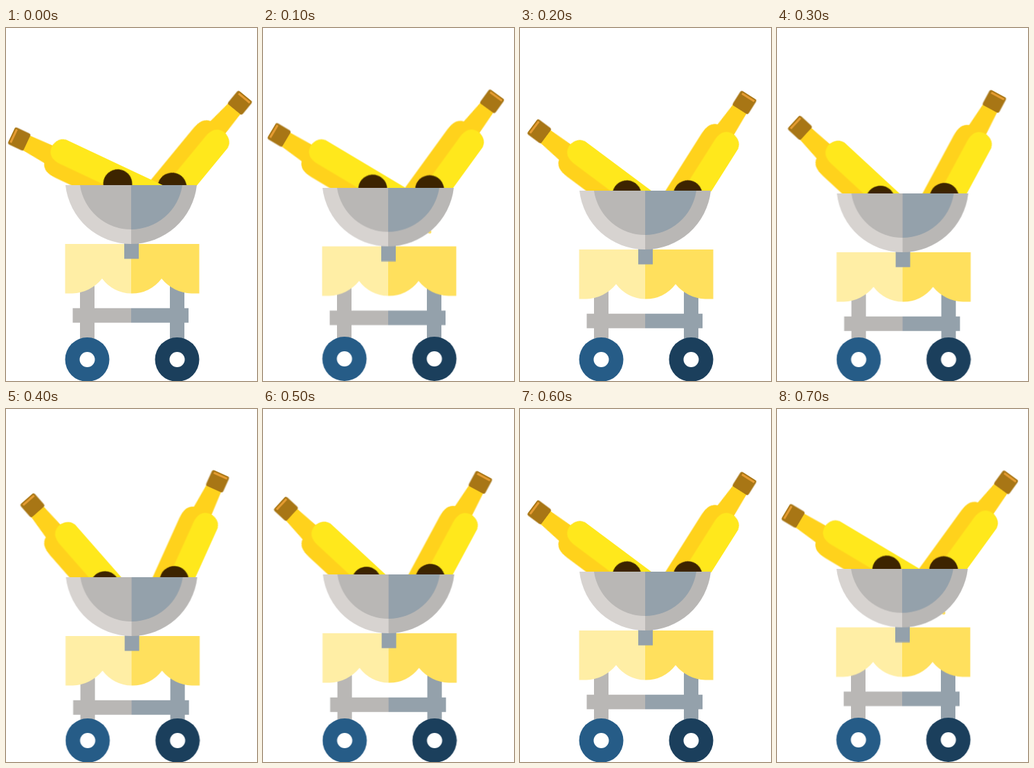
Recreate the animation shown at these times as an HTML page. Size 363 px wide and 510 px high, loop 0.8 s.

```html
<!DOCTYPE html>
<html lang="en">
<head>
<meta charset="utf-8">
<title>Bottle cart</title>
<style>
html, body { margin: 0; width: 100%; height: 100%; overflow: hidden; background: #fff; }
svg { display: block; width: 363px; height: 510px; }
.cart, .wheels, .left, .right, .tip { animation: 800ms step-end infinite; }
.cart { animation-name: cart; }
.wheels { animation-name: wheels; }
.left { animation-name: left; }
.right { animation-name: right; }
.tip { animation-name: tip; }

/* Five poses, played down and back up */
@keyframes cart {
  0%, 100% { transform: translate(0, 0); }
  12.5%, 87.5% { transform: translate(0, 3.5px); }
  25%, 75% { transform: translate(0, 8px); }
  37.5%, 62.5% { transform: translate(.6px, 12px); }
  50% { transform: translate(.6px, 16px); }
}
@keyframes wheels {
  0%, 25%, 75%, 100% { transform: translate(0, 0); }
  12.5%, 87.5% { transform: translate(.3px, -1px); }
  37.5%, 50%, 62.5% { transform: translate(.6px, 0); }
}
@keyframes left {
  0%, 100% { transform: translate(7.8px, 155px) rotate(25.2deg); }
  12.5%, 87.5% { transform: translate(12.5px, 144.5px) rotate(30.8deg); }
  25%, 75% { transform: translate(17.8px, 133.7px) rotate(36.7deg); }
  37.5%, 62.5% { transform: translate(23.3px, 123.7px) rotate(42.7deg); }
  50% { transform: translate(29.3px, 113.7px) rotate(48.7deg); }
}
@keyframes right {
  0%, 100% { transform: translate(346.3px, 98.3px) rotate(129.5deg); }
  12.5%, 87.5% { transform: translate(338.7px, 92.3px) rotate(126deg); }
  25%, 75% { transform: translate(331.4px, 89px) rotate(122.3deg); }
  37.5%, 62.5% { transform: translate(319.7px, 83px) rotate(118.3deg); }
  50% { transform: translate(310.5px, 77px) rotate(114.3deg); }
}
@keyframes tip {
  0%, 25%, 100% { opacity: 0; }
  12.5%, 87.5% { opacity: 1; }
}
</style>
</head>
<body>
<svg viewBox="0 0 363 510">
  <defs>
    <clipPath id="above"><path d="M-20-40H400V228H-20Z"/></clipPath>
    <!-- Lies along x, cap end at the origin -->
    <g id="bottle">
      <path fill="#ffd21c" d="M24-11L60-12Q63-28 78-28H250V28.500H84Q64 28.500 60 16L24 12.500Z"/>
      <path fill="#ffe81c" d="M250-28H78Q64-28 60-12V-8Q62 7.500 82 7.500H250Z"/>
      <circle fill="#3d2400" cx="169" cy="-2" r="21"/>
      <path fill="#a87615" d="M3-13.500H22Q25-13.500 25-11V11Q25 13.500 22 13.500H3Q0 13.500 0 10V-11Q0-13.500 3-13.500Z"/>
      <path fill="#e69c32" d="M2-11H5V10H2Z"/>
    </g>
  </defs>

  <g class="cart">
    <path fill="#b9b7b5" d="M107 365h21v100h-21zM96.500 404.700H181v21H96.500z"/>
    <path fill="#94a1ab" d="M237 365h21v100h-21zM181 404.700h83v21h-83z"/>

    <path fill="#ffeea5" d="M85.500 312H181V383.500A53 53 0 0 1 139 362A58 58 0 0 1 96 383.500H85.500Z"/>
    <path fill="#ffe05d" d="M181 312H279.500V383.500H268A58 58 0 0 1 225 362A53 53 0 0 1 181 383.500Z"/>

    <g clip-path="url(#above)">
      <use class="right" href="#bottle"/>
      <use class="left" href="#bottle"/>
    </g>
    <circle class="tip" fill="#ffe05d" cx="241" cy="291" r="2.500"/>

    <path fill="#94a1ab" d="M171 311h21v22.500h-21z"/>
    <path fill="#d7d3d0" d="M86 227H181V312A95.500 95.500 0 0 1 86 227Z"/>
    <path fill="#b9b7b5" d="M276 227H181V312A95.500 95.500 0 0 0 276 227Z"/>
    <path fill="#b9b7b5" d="M107 227H181.500V291A74.800 74.800 0 0 1 107 227Z"/>
    <path fill="#94a1ab" d="M255 227H181V291A74.800 74.800 0 0 0 255 227Z"/>
  </g>

  <g class="wheels">
    <circle fill="#265c87" cx="117.500" cy="479" r="32"/>
    <circle fill="#1b3f5c" cx="247.500" cy="479" r="32"/>
    <circle fill="#fff" cx="117.500" cy="479" r="11"/>
    <circle fill="#fff" cx="247.500" cy="479" r="11"/>
  </g>
</svg>
</body>
</html>
```
